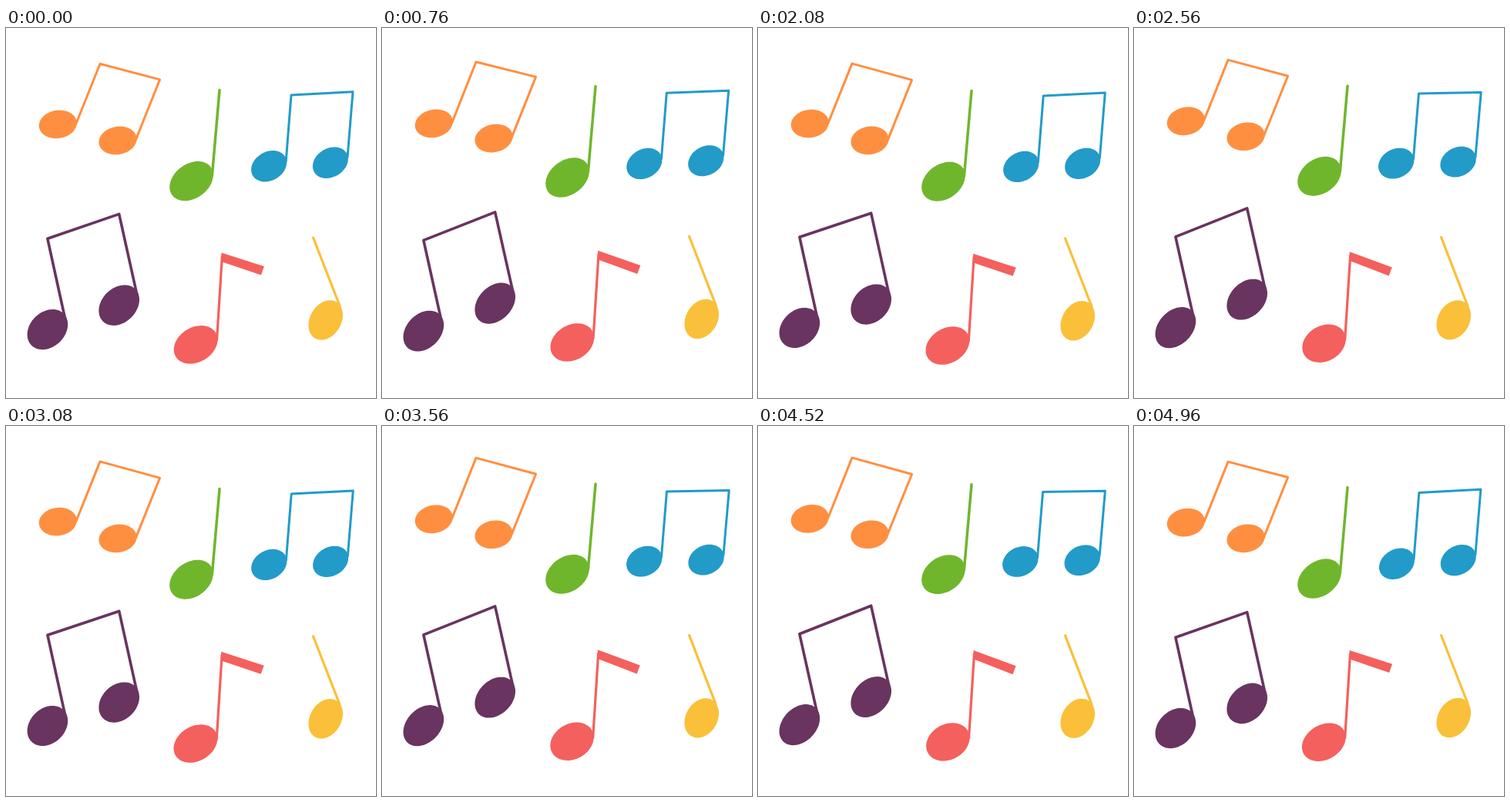
Recreate the animation shown at these times as an HTML page. Size 480 by 480 pixels, loop 5 s.

```html
<!DOCTYPE html>
<html lang="en">
<head>
<meta charset="utf-8">
<title>Dancing notes</title>
<style>
  html, body { margin: 0; width: 100%; height: 100%; overflow: hidden; background: #fff; }
  svg { display: block; width: 100%; height: 100%; }
</style>
</head>
<body>
<svg id="stage" viewBox="0 0 480 480"></svg>
<script>
const STEP = 40, BEAT = 1000, WAVE = 750, TAU = Math.PI * 2;

// heads: centres; head: [semi-axis, semi-axis, degrees]; stem: polyline; flag: polygon
// amp, phase, lean: size, delay at the first head and tilt of the wave
const notes = [
  { color: '#ff8f40', amp: 2.65, phase: -0.074, lean: 0, width: 3,
    heads: [[67.3, 122.6], [145, 143.4]], head: [24.7, 18.1, -10],
    stem: [[91, 121.5], [122, 43.8], [199.6, 64.8], [168, 143.5]] },
  { color: '#70b62c', amp: 3.5, phase: 0.093, lean: 0, width: 3.5,
    heads: [[240.5, 195.7]], head: [30.7, 22.5, -35],
    stem: [[267.4, 189], [277, 78.3]] },
  { color: '#229bc9', amp: 2.45, phase: 0.138, lean: 0.24, width: 3,
    heads: [[340.7, 177.7], [420.8, 174.6]], head: [24.2, 18.7, -28],
    stem: [[362.9, 172], [369.8, 86.4], [450.2, 83.6], [443.1, 168]] },
  { color: '#693460', amp: 4.4, phase: -0.174, lean: 0, width: 3.6,
    heads: [[53.9, 389.1], [146.7, 355.5]], head: [29.8, 22.3, -45],
    stem: [[77, 376], [53.9, 271.3], [146.7, 237.2], [170, 342]] },
  { color: '#f4605d', amp: 2.7, phase: 0.23, lean: -0.22, width: 3.2,
    heads: [[246.2, 410.5]], head: [29.9, 22.7, -30],
    stem: [[273.5, 405], [280.4, 296]],
    flag: [[279.4, 291.4], [334.7, 310.4], [330.7, 321.5], [279.8, 303]] },
  { color: '#fac03a', amp: 1.72, phase: 0.276, lean: 0, width: 3.2,
    heads: [[414.7, 379.2]], head: [27.2, 20.4, -60],
    stem: [[433, 361], [398.5, 272]] }
];

const stage = document.getElementById('stage');

function addPath(attrs) {
  const el = document.createElementNS('http://www.w3.org/2000/svg', 'path');
  for (const key in attrs) el.setAttribute(key, attrs[key]);
  return stage.appendChild(el);
}

function ellipse([cx, cy], [a, b, deg]) {
  const r = deg * Math.PI / 180, c = Math.cos(r), s = Math.sin(r);
  return Array.from({ length: 64 }, (_, i) => {
    const u = a * Math.cos(i / 64 * TAU), v = b * Math.sin(i / 64 * TAU);
    return [cx + u * c - v * s, cy + u * s + v * c];
  });
}

// Shift a point along the wave's swing, delayed by its distance along the wave.
function warp(note, [x, y], beat) {
  const [x0, y0] = note.heads[0];
  const c = Math.cos(note.lean), s = Math.sin(note.lean);
  const lag = note.phase + ((x - x0) * c - (y - y0) * s) / WAVE;
  const d = note.amp * Math.cos(TAU * (beat - lag));
  return [x + d * s, y + d * c];
}

function pathData(note, points, beat) {
  return 'M' + points.map(p => warp(note, p, beat).map(n => n.toFixed(2)).join(' ')).join('L');
}

for (const note of notes) {
  note.solids = note.heads.map(h => ellipse(h, note.head));
  if (note.flag) note.solids.push(note.flag);
  note.fill = addPath({ fill: note.color });
  note.line = addPath({
    fill: 'none', stroke: note.color, 'stroke-width': note.width,
    'stroke-linecap': 'round', 'stroke-linejoin': 'round'
  });
}

function draw(ms) {
  const beat = Math.floor(ms / STEP) * STEP % BEAT / BEAT;
  for (const note of notes) {
    note.fill.setAttribute('d', note.solids.map(s => pathData(note, s, beat) + 'Z').join(''));
    note.line.setAttribute('d', pathData(note, note.stem, beat));
  }
}

const start = performance.now();
function tick() {
  draw(performance.now() - start);
  requestAnimationFrame(tick);
}
draw(0);
requestAnimationFrame(tick);
</script>
</body>
</html>
```
